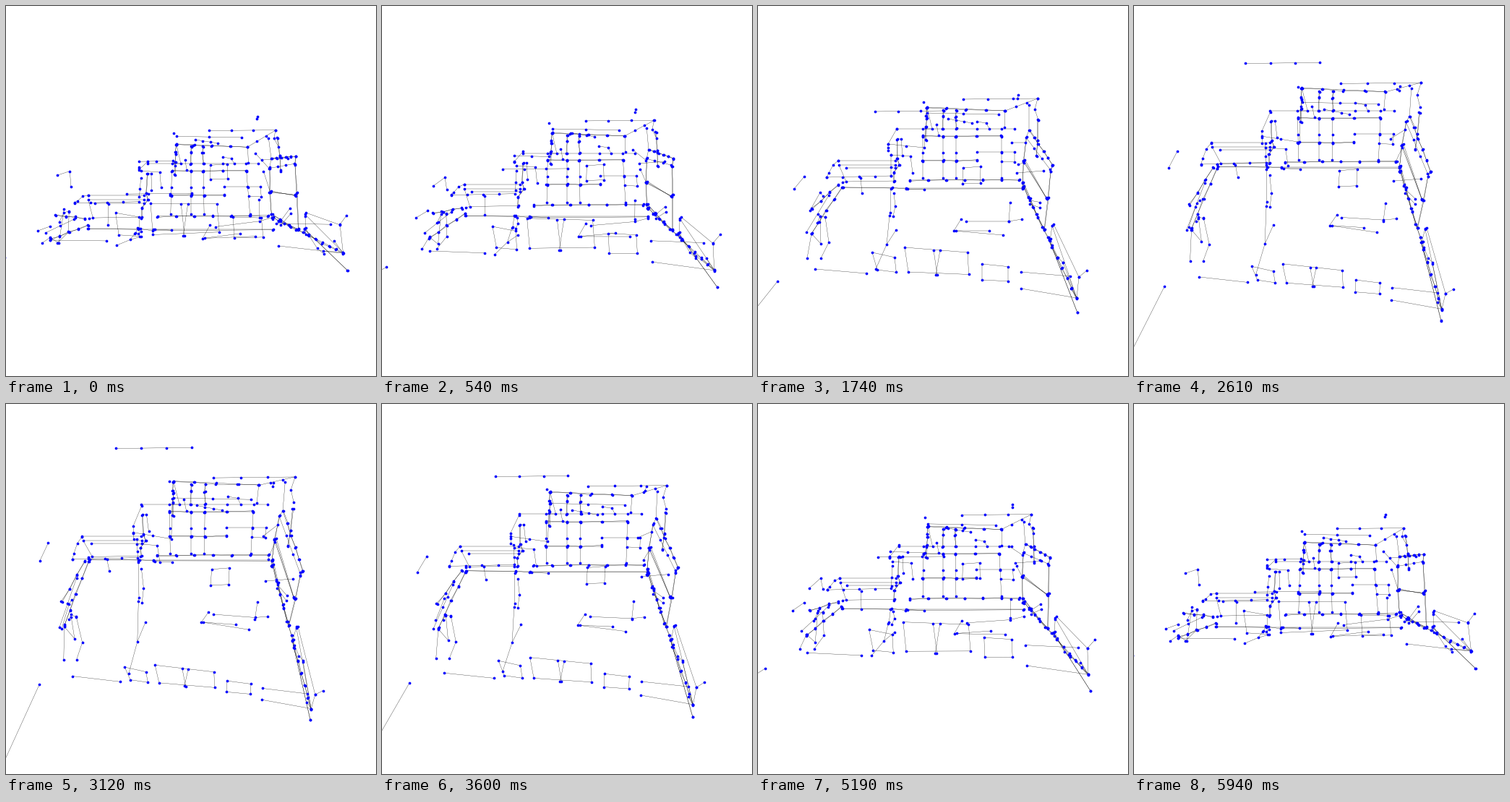
Animation of 512 by 512 pixels, one loop 5970 ms. Source, as a matplotlib script:

```python
import numpy as np
import matplotlib.pyplot as plt
from matplotlib.animation import FuncAnimation
from matplotlib.collections import LineCollection

SIZE, FRAMES, LOOP = 512, 199, 5970
FOCAL, TURN, REST = 335, 0.0062, 58
MID = SIZE / 2

rng = np.random.default_rng(4)
nodes, edges = [], []


# Planes of the scene: depth behind the turning axis, seen at rest
def front(x, y):
    return 143 + 0.33 * (y - MID)


def left(x, y):
    return 20 + 2.9 * (x - 73)


def right(x, y):
    return 1601 - 4.04 * x


def ground(x, y):
    return 150 - 2.2 * (y - 253)


def lawn(x, y):
    return 25 - 0.35 * (x - 280)


def near(x, y):
    return -160 + 0.6 * (y - 355) - 0.25 * (x - 250)


def path(depth, x, y, strands=1):
    """Join points lying on a plane; extra strands are slightly shaken."""
    x, y = np.broadcast_arrays(np.atleast_1d(x).astype(float), y)
    if callable(depth):
        z = depth(x, y)
    else:
        z = np.linspace(*np.broadcast_to(depth, 2), x.size)
    p = np.column_stack([x - MID, y - MID, z])
    for k in range(strands):
        q = p + (k > 0) * rng.uniform(-1.5, 1.5, p.shape)
        nodes.extend(q)
        edges.extend(zip(q[:-1], q[1:]))


def run(depth, start, end, n=2, strands=1):
    """Evenly spaced points from start to end."""
    path(depth, *np.linspace(start, end, n).T, strands)


def frame(depth, x0, x1, top, bottom, slope=0.08, lean=4):
    drop = slope * (x1 - x0)
    path(depth, [x0, x1, x1 + lean / 3, x0 + lean, x0],
         [top, top + drop, bottom + drop / 2, bottom, top])


def facade():
    cols = np.array([228, 256, 274, 303, 337, 355])
    path(front, cols, 170)
    path(front, cols[:5], 180, 2)
    path(front, cols[3:5], 202)
    path(front, cols[:4], 214, 2)
    path(front, cols[[4, 5, 5, 4]], [202, 202, 216, 215])
    run(front, (210, 241), (362, 240), 7, 2)
    for x in cols[[0, 1, 2, 4]]:
        path(front, x, [181, 203, 215, 238])
    for x in cols[[1, 2]]:
        path(front, x, [144, 153, 170], 2)
    path(front, 233, [141, 152, 156, 167, 186], 2)
    path(front, [234, 241], [141, 170])
    path(front, [247, 250], [164, 179])
    path(front, [342, 341], [145, 168])
    path(front, [303, 316, 320], [160, 162, 170])
    run(45, (263, 156), (296, 162), 4)
    frame(-20, 284, 308, 224, 246, -0.08, -1)


def roof():
    run(72, (284, 129), (387, 128), 4)
    run(front, (234, 140), (342, 145), 5, 2)
    run((105, 73), (342, 145), (387, 128), 4)
    run(50, (234, 148), (333, 150), 3)
    path(72, [387, 383, 388], [128, 143, 158])
    path(20, [360, 359], [123, 128])
    path(73, 229, 133)
    run(305, (162, 146), (257, 145), 4)


def wing():
    # Stepped block
    path(front, [192, 241], 170)
    path((104, 50), [192, 180, 180, 180], [170, 191, 196, 200])
    run((50, 35), (180, 191), (230, 196), 3)
    path((50, 52), [184, 211, 214], [206, 208, 231])
    path(front, [193, 193, 195, 188, 189], [184, 211, 220, 230, 242], 2)
    path(front, [193, 198, 200], [184, 184, 207])
    path(80, 184, [206, 223, 235])
    path((130, 35), [232, 230], [167, 196])
    # Long low rows
    for x, y in ((111, 214), (112, 220), (122, 224)):
        path(front, [x, 190], [y, y])
    run(98, (95, 237), (184, 235), 5)
    path((100, 122), [142, 144], [238, 259])
    path(front, [117, 122, 189], [244, 243, 242])
    path((128, 95), [111, 104, 98, 95], [214, 220, 231, 237])
    path(front, [112, 122], [220, 243])
    path(158, [117, 185, 205, 367], [251, 252, 252, 252], 2)
    run(155, (207, 253), (230, 254))


def left_wall():
    run(left, (116, 251), (74, 315), 5, 2)
    run(left, (111, 247), (75, 281), 4, 2)
    run(left, (98, 262), (67, 313), 3)
    path((-134, -35), [72, 86, 90], [283, 258, 263])
    path((0, -20), [82, 86, 93], [300, 291, 292])
    path((-25, 15), [86, 87, 74], [291, 329, 315])
    path((-15, -61), [93, 98, 87], [292, 327, 349])
    path(ground, [74, 68], [315, 349])
    run((160, 190), (50, 253), (64, 236))
    run((-100, -360), (27, 381), (-67, 499))


def right_wall():
    run(right, (367, 250), (441, 404), 12, 2)
    run(right, (366, 244), (396, 310), 4, 2)
    run(right, (368, 214), (399, 266), 2, 3)
    run(right, (375, 172), (408, 220), 6, 2)
    run(right, (371, 182), (404, 226), 4)
    path(right, [371, 368, 366, 367], [182, 214, 244, 252], 2)
    path(right, [408, 405, 401, 396], [220, 229, 266, 310], 2)
    path(right, [375, 375, 371], [137, 172, 182])
    path(right, [388, 387, 385], [158, 186, 207], 2)
    for y in (269, 274):
        run(right, (376, y), (390, y + 0.5 * (y - 264)))
    run((20, 85), (351, 189), (370, 189))
    run((19, 110), (360, 219), (368, 217))
    run(-60, (358, 231), (395, 228))
    # Fence towards the viewer
    path((-40, -25), [409, 407, 404], [302, 304, 325])
    for z, start, end in ((-195, (409, 302), (444, 375)),
                          (-181, (407, 304), (441, 404))):
        run((-40, z), start, end)
    path(-40, [405, 407, 415, 422], [322, 331, 348, 355])
    path((-40, -178), [403, 442], [324, 424], 2)
    run((-50, -181), (422, 355), (441, 404))


def yard():
    path(ground, [184, 183, 182, 178, 191], [253, 286, 290, 330, 310])
    path(ground, [188, 190, 187], [259, 277, 291])
    path(ground, [163, 178], [364, 330])
    path(near, [79, 150], [364, 370])
    frame(near, 158, 189, 341, 365, 0.22, 7)
    frame(near, 203, 290, 334, 368, 0.08, 5)
    for a, b in ((243, 248), (252, 246)):
        path(near, [a, b], [338, 372])
    frame(near, 310, 346, 357, 379, 0.1, 0)
    path(near, [364, 432], [368, 374])
    path(near, [364, 441, 444, 455], [391, 404, 375, 366])
    path(near, [441, 433], [404, 391])
    path(lawn, [281, 271, 274, 320], [295, 311, 311, 311])
    path(lawn, [271, 339], [311, 317])
    path(lawn, [288, 347, 365], [298, 298, 295])
    path(-10, [347, 349], [298, 272])


for part in (facade, roof, wing, left_wall, right_wall, yard):
    part()
nodes = np.unique(np.array(nodes), axis=0)
edges = np.array(edges)


def phase(i):
    """Steady tilt up, then a slightly slower start on the way back."""
    return np.interp(i, [0, 58, 99, 140, 198], [0, 58, 99.5, 58.6, 0])


def project(p, i):
    a = TURN * (phase(i) - REST)
    x, y, z = p[..., 0], p[..., 1], p[..., 2]
    c, s = np.cos(a), np.sin(a)
    k = FOCAL / (FOCAL - z + z * c + y * s)
    return np.stack([MID + k * x, MID + k * (y * c - z * s)], axis=-1)


fig = plt.figure(figsize=(5.12, 5.12), dpi=100, facecolor="white")
ax = fig.add_axes([0, 0, 1, 1])
ax.set_xlim(0, SIZE)
ax.set_ylim(SIZE, 0)
ax.axis("off")

wires = LineCollection(project(edges, 0), colors="black", linewidths=0.22)
ax.add_collection(wires)
marks, = ax.plot(*project(nodes, 0).T, "o", color="blue", ms=2.7, mew=0)


def update(i):
    wires.set_segments(project(edges, i))
    marks.set_data(*project(nodes, i).T)
    return wires, marks


anim = FuncAnimation(fig, update, frames=FRAMES, interval=LOOP / FRAMES,
                     repeat=True, repeat_delay=0, blit=False)
plt.show()
```
